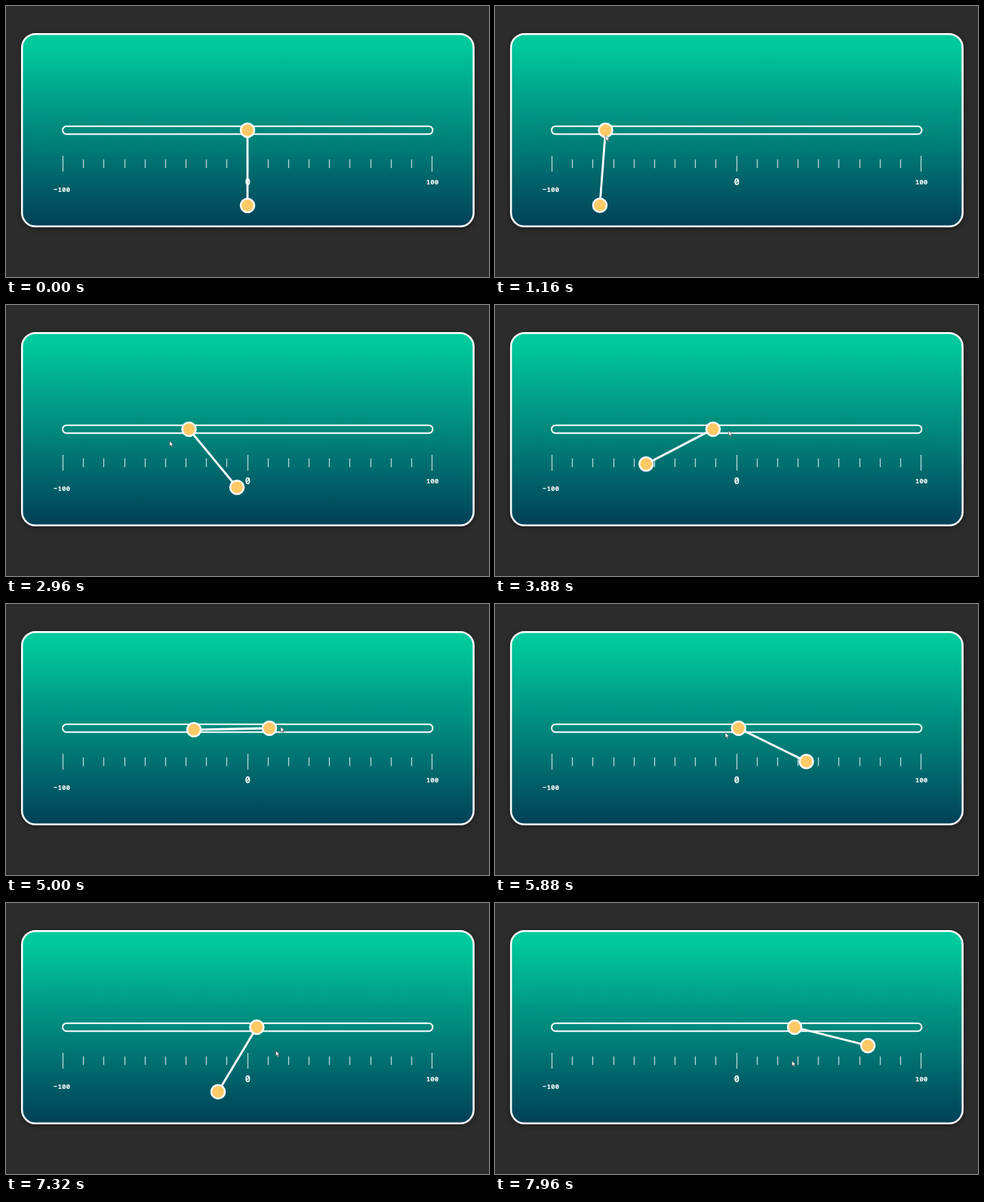
An HTML page for the animation above (8 s loop, 640x360 px).

```html
<!DOCTYPE html>
<html lang="en">
<head>
<meta charset="utf-8">
<title>Pendulum slider</title>
<style>
  html, body { margin: 0; width: 100%; height: 100%; overflow: hidden; background: #2c2c2c; }
  svg { display: block; width: 100%; height: 100%; }
  text { fill: #fff; font-family: "Noto Sans Mono", monospace; font-weight: 600; text-anchor: middle; }
  .card { fill: url(#sea); stroke: #fff; stroke-width: 2.5; filter: drop-shadow(0 2px 3px rgba(0, 0, 0, .35)); }
  .track { fill: none; stroke: #fff; stroke-width: 2; }
  .ticks { fill: none; stroke: #b5d7d9; stroke-width: 1.3; }
  .rod { stroke: #fff; stroke-width: 2.8; }
  .knob { fill: #ffc965; stroke: #fff; stroke-width: 2.5; }
  .cursor { fill: #fff; stroke: #333; stroke-width: .6; }
</style>
</head>
<body>
<svg viewBox="0 0 640 360">
  <defs>
    <linearGradient id="sea" x1="0" y1="0" x2="0" y2="1">
      <stop offset="0.06" stop-color="#00c99d"/>
      <stop offset="1" stop-color="#004058"/>
    </linearGradient>
  </defs>
  <rect class="card" x="21.2" y="37.2" width="598.4" height="255.6" rx="18"/>
  <rect class="track" x="75" y="159.8" width="490.4" height="10.4" rx="5.2"/>
  <path class="ticks" id="ticks"/>
  <text x="74" y="246.5" font-size="9.3">−100</text>
  <text x="320.4" y="238" font-size="12">0</text>
  <text x="565" y="236.5" font-size="9.3">100</text>
  <line class="rod" id="rod"/>
  <circle class="knob" id="cart" r="9"/>
  <circle class="knob" id="bob" r="9"/>
  <path class="cursor" id="cursor" d="M0 0V7.2L1.7 5.7 2.9 8.3 4.1 7.7 2.9 5.2H5.2Z"/>
</svg>
<script>
const LOOP = 8000, STEP = 40, REST = 240;
const LENGTH = 100, CART_Y = 165, LEAD = 0.105;

// Turning points in seconds; everything swings between them on a half cosine
const cartX = swing([.24, 320], [1.16, 146.5], [2.06, 473.6], [3.25, 205], [4.4, 351],
  [4.68, 320], [5.32, 378], [6.68, 226], [7.8, 400], [8.4, 382]);
const angle = swing([.24, 0], [.72, 34], [1.68, -54.2], [2.68, 54.5], [3.88, -62.5],
  [4.44, 58], [5, -88.8], [5.7, 70], [7, -63.3], [8, 76.4]);
const cursorY = swing([1.1, 172], [2.04, 188], [4.6, 162], [10.6, 242]);

function swing(...turns) {
  return t => {
    const next = turns.findIndex(([time]) => time > t);
    if (next === 0) return turns[0][1];
    const [t0, a] = turns[next - 1], [t1, b] = turns[next];
    return a + (b - a) * (1 - Math.cos(Math.PI * (t - t0) / (t1 - t0))) / 2;
  };
}

const el = id => document.getElementById(id);
const set = (id, attrs) => {
  for (const name in attrs) el(id).setAttribute(name, attrs[name]);
};

function draw(ms) {
  const t = ms / 1000, x = cartX(t), a = angle(t) * Math.PI / 180;
  const bx = x + LENGTH * Math.sin(a), by = CART_Y + LENGTH * Math.cos(a);
  // The cart trails the pointer
  const speed = (cartX(t + .01) - cartX(t - .01)) / .02;
  set('rod', { x1: x, y1: CART_Y, x2: bx, y2: by });
  set('cart', { cx: x, cy: CART_Y });
  set('bob', { cx: bx, cy: by });
  set('cursor', {
    transform: `translate(${x + LEAD * speed} ${cursorY(t)})`,
    visibility: ms < REST ? 'hidden' : 'visible'
  });
}

let ticks = '';
for (let i = 0; i <= 18; i++) {
  const half = i % 9 ? 5.7 : 10.5;
  ticks += `M${75.5 + Math.round(i * 27.17)} ${209.5 - half}v${2 * half}`;
}
set('ticks', { d: ticks });

const start = performance.now();
function frame() {
  const t = (performance.now() - start) % LOOP;
  draw(Math.floor(t / STEP) * STEP);
  requestAnimationFrame(frame);
}
frame();
</script>
</body>
</html>
```
